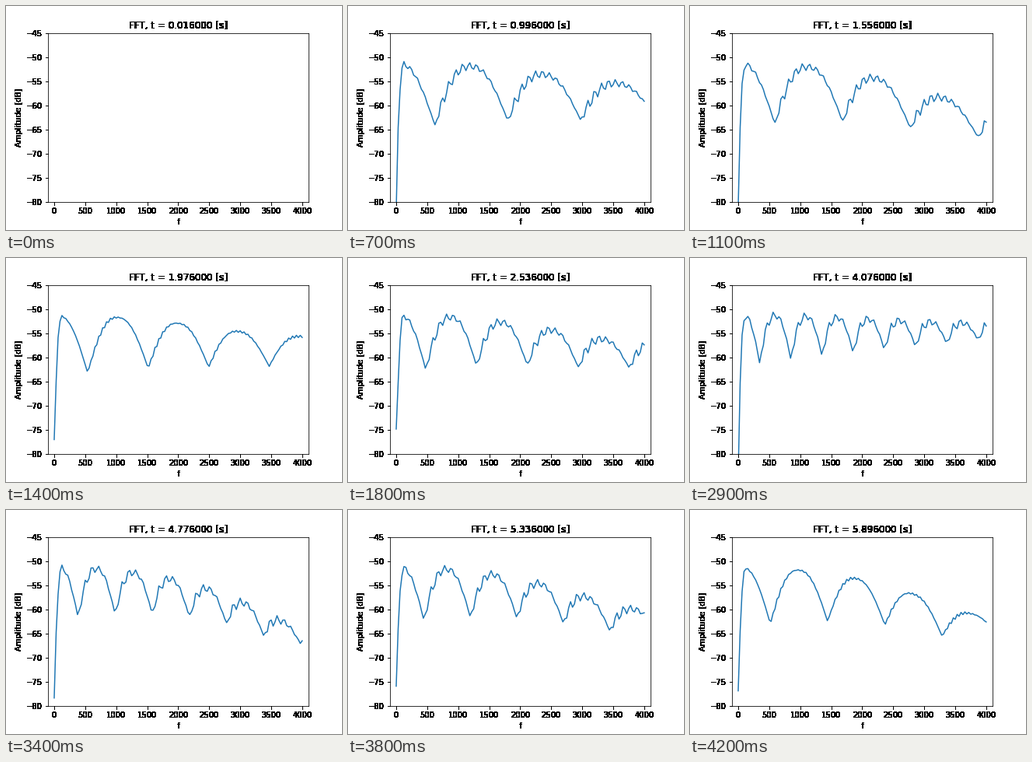
Write a matplotlib script that moves like this. It is 432 by 288 pixels and loops after 4.3 s.

```python
import numpy as np
import matplotlib.pyplot as plt
from matplotlib.animation import FuncAnimation

FRAMES, INTERVAL = 43, 100
T0, DT = 0.016, 0.14
RATE, BLOCK = 8000, 256

bins = np.arange(BLOCK // 2 + 1)
freq = bins * RATE / BLOCK


def solid(img, dpi):
    """Turn every touched pixel into opaque black, without soft edges."""
    out = np.zeros_like(img)
    out[..., 3] = img[..., 3] > 0
    return out, 0, 0


def notch_spacing(t):
    """Distance between comb notches in Hz, swept by a slow oscillator."""
    drift = np.interp(t, [1, 1.976, 2.536, 3.376, 4.776, 5.896],
                      [0, -13, 15, 0, -1, -25])
    return 840.7 - 338.5 * np.cos(t - 4) + drift


def spectrum(t):
    """Level in dB of noise that passed a swept comb filter."""
    gap = notch_spacing(t)
    pos = (freq - 0.415 * gap - 135) / gap
    phase = pos % 1

    # High-frequency loss of a linearly interpolated delay line
    part = (RATE / gap) % 1
    omega = 2 * np.pi * freq / RATE
    power = 1 - 2 * part * (1 - part) * (1 - np.cos(omega))
    level = -51.3 + 10 * np.log10(power)

    # Comb notches, shallower towards high frequencies
    depth = 12.8 - 1.8 * freq / 1000 + (gap - 980) / 200
    level -= depth * (1 - np.sin(np.pi * phase)) ** 1.2

    # Ripple on the rising side of each lobe
    size = np.clip(abs(gap - 955) / 130, 0.35, 1.1)
    period = np.interp(size, [0.35, 1], [2.1, 3.6])
    dist = phase * gap * BLOCK / RATE
    fade = np.minimum(1, dist / 3) * (1 - phase)
    level += 1.3 * size * fade * np.cos(2 * np.pi * (dist - 3.5) / period)

    # Steep roll-off next to zero
    level[:4] -= [27.5 + 3.5 * np.cos(2.1 * (t - 1)), 13.5, 4.8, 1]
    return level


fig, ax = plt.subplots(figsize=(6, 4), dpi=72, facecolor="white")
fig.subplots_adjust(left=0.125, right=0.9, bottom=0.125, top=0.88)
line, = ax.plot([], [], color="#1f77b4", lw=1.5)
ax.set_xlim(-100, 4100)
ax.set_ylim(-80, -45)
ax.set_xticks(range(0, 4001, 500))
ax.set_yticks(range(-80, -44, 5))
ax.set_xlabel("f")
ax.set_ylabel("Amplitude [dB]")
title = ax.set_title("")

for axis in (ax.xaxis, ax.yaxis):
    for part in [axis.label, *axis.get_ticklabels(), *axis.get_ticklines()]:
        part.set_agg_filter(solid)
title.set_agg_filter(solid)


def update(i):
    t = T0 + DT * i
    title.set_text(f"FFT, t = {t:.6f} [s]")
    if i == 0:
        line.set_data([], [])
    else:
        line.set_data(freq, spectrum(t))
    return line, title


anim = FuncAnimation(fig, update, frames=FRAMES, interval=INTERVAL,
                     init_func=lambda: update(0), repeat=True, blit=False)
plt.show()
```
